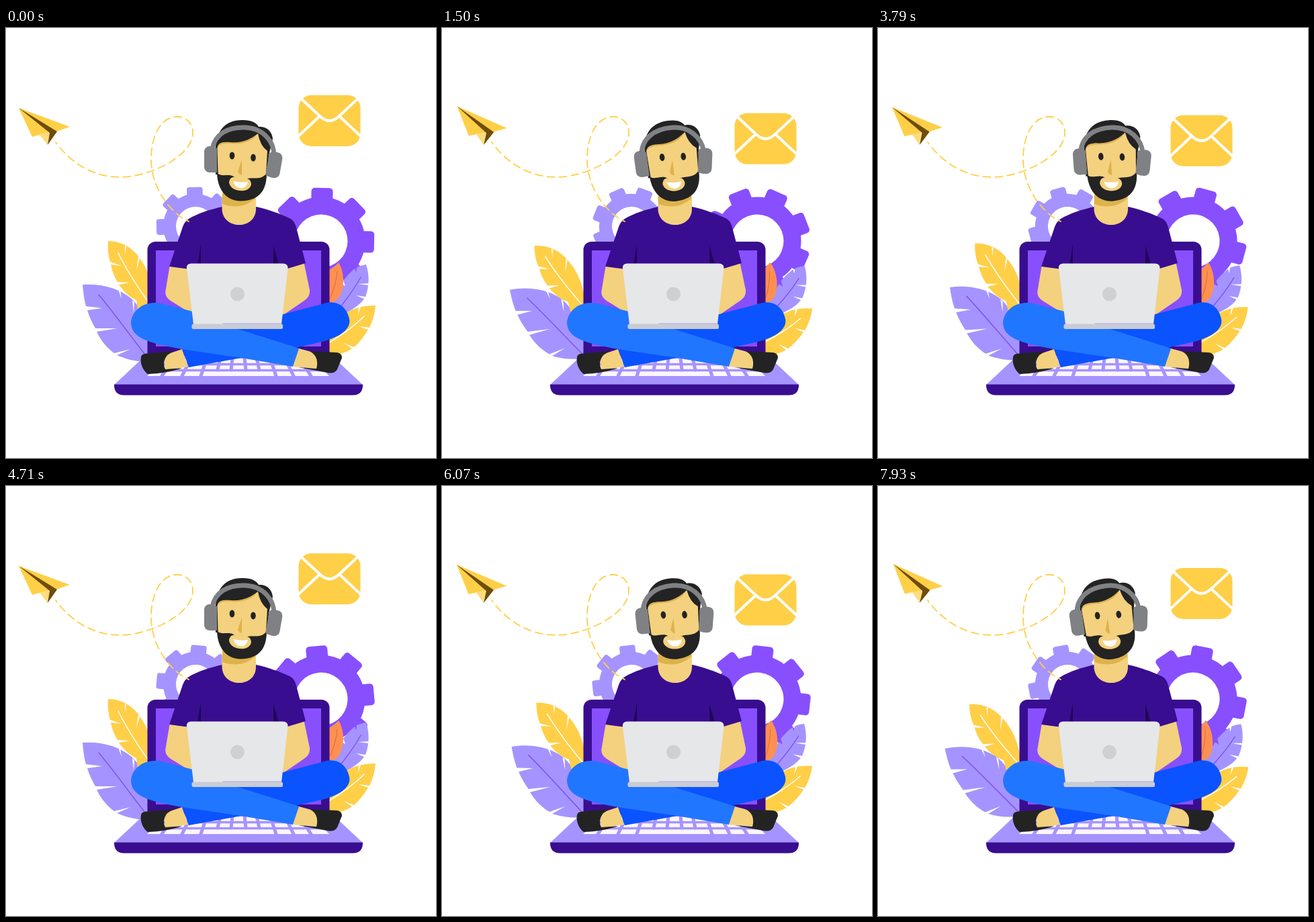
An HTML page that plays this animation: 640x640 px, repeating every 8000 ms.

```html
<!DOCTYPE html>
<html lang="en">
<head>
<meta charset="utf-8">
<title>Working online</title>
<style>
html, body { margin: 0; height: 100%; overflow: hidden; background: #fff; }
svg { display: block; width: 100vw; height: 100vh; --sway: 0; --bob: 0; --spin: 0deg; }
.sway { transform: rotate(calc(var(--sway) * var(--angle))); transform-origin: var(--pivot); }
.bob { transform: translateY(calc(var(--bob) * 32px)); }
.spin { transform: rotate(var(--spin)); transform-origin: 0 0; }
.back { transform: rotate(calc(var(--spin) * -1)); transform-origin: 0 0; }
.line { fill: none; stroke-linecap: round; }
.yellow { fill: #ffcf48; }
.lilac { fill: #a594ff; }
.violet { fill: #884fff; }
.indigo { fill: #390d8f; }
.skin { fill: #f4d17e; }
.tan { fill: #deb24c; }
.black { fill: #232323; }
.grey { fill: #808184; }
.white { fill: #fff; }
</style>
</head>
<body>
<svg id="scene" viewBox="0 0 640 640">
  <defs>
    <g id="gear">
      <rect id="teeth" x="-16" y="-79" width="32" height="158" rx="5"/>
      <use href="#teeth" transform="rotate(45)"/>
      <use href="#teeth" transform="rotate(90)"/>
      <use href="#teeth" transform="rotate(135)"/>
      <circle r="65.500"/>
      <circle r="39.500" class="white"/>
    </g>
    <clipPath id="keys"><path d="M238 492H456L481 518H210Z"/></clipPath>
  </defs>

  <!-- gears -->
  <g transform="translate(282 295) scale(.735)"><use href="#gear" class="back lilac"/></g>
  <g transform="translate(469 317)"><use href="#gear" class="spin violet"/></g>

  <!-- leaves -->
  <g class="sway" style="--angle:-9.8deg; --pivot:172px 495px">
    <path class="lilac" d="M114 382C141 380 168 387 187 403C202 417 213 440 218 496C196 498 179 493 165 487L185 478L161 484C150 476 141 465 135 452L166 447L133 447C128 438 124 430 121 420L143 417L119 414C116 404 115 393 114 382Z"/>
    <path class="white" d="M167 389L172 403L170 390ZM188 405L190 424L191 408Z"/>
    <path class="line" stroke="#8157ee" stroke-width="1.6" d="M138 397C160 423 188 462 214 495"/>
  </g>
  <g class="sway" style="--angle:-8deg; --pivot:218px 470px">
    <path class="yellow" d="M152 317C172 317 190 328 200 344C213 362 222 388 218 424H202L196 419L194 405C183 400 175 392 168 382L184 379L166 378C161 370 158 362 156 352L172 354L155 348C152 338 151 328 152 317Z"/>
    <path class="white" d="M177 324L177 338L179 325ZM197 340L194 361L199 343Z"/>
    <path class="line" stroke="#fff" stroke-width="1.6" d="M167 335C180 361 194 383 214 411"/>
  </g>
  <g class="sway" style="--angle:4.4deg; --pivot:495px 425px">
    <path class="lilac" d="M536 352C541 367 541 384 535 400L521 398L533 403C525 415 508 424 480 437V410C489 403 494 391 499 381L505 384L502 376C507 369 513 363 519 358L521 364L522 356Q529 353 536 352Z"/>
    <path class="white" d="M540 380L524 381L540 383Z"/>
    <path class="line" stroke="#8157ee" stroke-width="1.5" d="M528 371Q516 393 492 422"/>
  </g>
  <g class="sway" style="--angle:-9deg; --pivot:490px 410px">
    <path fill="#ff9052" d="M495 349C503 361 504 382 499 394C495 405 488 409 478 411V361Q488 357 495 349Z"/>
    <path class="line" stroke="#d96d39" d="M493 362Q491 384 482 402"/>
  </g>
  <g class="sway" style="--angle:5.5deg; --pivot:482px 435px">
    <path class="yellow" d="M550 413C549 425 546 436 541 446L525 444L539 449C533 459 526 468 518 475L503 469L515 477C505 484 493 487 478 487V454C487 444 492 438 500 430L503 441L503 427C509 422 517 418 525 416L524 427L528 415Q539 413 550 413Z"/>
    <path class="line" stroke="#fff" stroke-width="1.5" d="M533 429Q513 449 480 469"/>
  </g>

  <!-- large laptop -->
  <rect class="indigo" x="210.500" y="318" width="271" height="185" rx="12"/>
  <rect class="violet" x="223" y="331" width="246" height="143"/>
  <path class="lilac" d="M161 531L207 488H485L531 531Z"/>
  <g clip-path="url(#keys)">
    <path fill="#fdf6ff" d="M200 490H490V518H200Z"/>
    <path class="line" stroke="#a594ff" stroke-width="3.500" d="M200 500.500H490M200 509.500H490"/>
    <path class="line" stroke="#a594ff" stroke-width="5" d="M346 350L232 518M346 350L262 518M346 350L290 518M346 350L402 518M346 350L428 518M346 350L454 518"/>
    <path class="line" stroke="#a594ff" stroke-width="5" d="M319 491L315 509M337 491L335 509M355 491L357 509M373 491L377 509"/>
  </g>
  <path class="indigo" d="M161 530.500H531V533Q530 546.500 516 546.500H176Q162 546.500 161 533Z"/>

  <!-- body -->
  <path class="skin" d="M244 352L237.500 391Q236 400 245 406L282 429L272 354ZM443 347L452 390Q453 399 445 405L410 429L416 354Z"/>
  <path class="indigo" d="M322 266C304 270 285 276 272 284C266 288 264 293 262 299L243 355L274 359H416L446 350L432 297C430 290 428 286 422 283C407 276 390 270 372 266Z"/>
  <path fill="#210659" d="M290 322L285 352H290ZM398 324L406 352H398Z"/>
  <path class="skin" d="M321.500 250V269C322 301 372 301 372 269V250Z"/>
  <path class="tan" d="M322 262Q350 272 371 254V245H322Z"/>

  <!-- legs and shoes -->
  <path fill="#0a53ff" d="M405 428L470 411C491 403 507 414 511 433C514 448 497 460 470 467L435 475L350 491L272 505L262 477L300 440Z"/>
  <path fill="#2176ff" d="M278 422L235 411C207 403 187 420 186 439C187 462 213 469 262 478L350 491L427 504L437 477L345 448H279Z"/>
  <path class="skin" d="M235 487L262 478L271 504L237 509ZM436 477L462 484L464 507L427 504Z"/>
  <path class="black" d="M201 490C202 484 207 485 214 484L249 481L240 487Q232 497 237 508L262 506Q241 514 211 515C205 511 199 500 201 490ZM452 481L493 483Q500 484 500 491L493 508Q490 514 481 513.500L435 505L462 507Q467 489 452 481Z"/>

  <!-- small laptop -->
  <path fill="#e6e7e9" d="M276 350.500H412Q420 350.500 419.500 358L410 441H279L269 358Q268 350.500 276 350.500Z"/>
  <rect x="276.500" y="440.500" width="135.500" height="7.500" rx="2.500" fill="#c9ccd4"/>
  <path class="line" stroke="#a9a0ef" stroke-width="1" d="M323 440H410"/>
  <circle cx="344.500" cy="396" r="10.500" fill="#cfd0d2"/>

  <!-- head -->
  <g class="sway" style="--angle:-11deg; --pivot:351px 257px">
    <path class="black" d="M312 218V190C310 154 325 137 352 137C365 137 373 141 376 147C387 146 396 153 397 165L391 190L389 218Z"/>
    <path class="skin" d="M314.500 178C316 172 320 170 326 170C350 174 366 165 375 157Q378 175 389 183L386 232H316Z"/>
    <path class="tan" d="M315 177C318 170 326 169 334 170C351 172 365 165 374 158C367 169 350 174 334 172Q320 171 315 177Z"/>
    <path class="black" d="M314 216C321 222 329 217 337 220Q348 227 360 224C370 222 380 227 388 216C388 242 377 257 349 257.500C327 257 315 240 314 216Z"/>
    <path class="skin" d="M332 230C333 219 343 221 348 224C355 223 364 222 365 232C364 247 334 245 332 230Z"/>
    <path class="white" d="M338 227.500Q349 231 360 229Q358 239 349 238.500Q340 237 338 227.500Z"/>
    <path class="tan" d="M351 196L345 213Q346 218 351 219Z"/>
    <ellipse class="black" cx="336.500" cy="190" rx="3.800" ry="5.500"/>
    <ellipse class="black" cx="368" cy="193" rx="3.800" ry="5.500"/>
    <path class="line" stroke="#808184" stroke-width="7" d="M307 180C311 158 330 147 356 148C382 149 399 168 399 190"/>
    <rect class="grey" x="295" y="176" width="19" height="39" rx="8"/>
    <path class="grey" d="M304 176L314 179V215H304Z"/>
    <g transform="rotate(10 399 204)">
      <rect class="grey" x="389" y="184.500" width="20.500" height="38.500" rx="8"/>
      <rect class="grey" x="389" y="186" width="10" height="36" rx="3"/>
    </g>
  </g>

  <!-- paper plane -->
  <path class="line" stroke="#ffcf48" stroke-width="1.800" stroke-linecap="butt" stroke-dasharray="11 7" stroke-dashoffset="8" d="M74 170C99 205 135 222 170 222C213 222 278 191 278 156C278 140 267 132 254 132C231 132 216 160 216 195C216 240 246 276 272 288"/>
  <g class="sway" style="--angle:5deg; --pivot:62px 174px">
    <path class="yellow" d="M19 119L95 147L75 154L65 155L39 162Z"/>
    <path fill="#ffdc7d" d="M50 159L65 155L62 174Z"/>
    <path fill="#6f4c08" d="M19 119L76 154L62 174L65 156Z"/>
  </g>

  <!-- envelope -->
  <g class="bob">
    <rect class="yellow" x="435.500" y="100" width="92" height="76" rx="19"/>
    <path class="line" stroke="#fff" stroke-width="4" d="M438 104L467 131Q481.500 145 496 131L525 104M434 162L465 133M529 162L498 133"/>
  </g>
</svg>
<script>
const LOOP = 8000, CYCLE = 4800, FPS = 14, LEAD = 16;
const { style } = document.getElementById('scene');
const swing = (t, period) => (1 - Math.cos(2 * Math.PI * t / period)) / 2;

function draw() {
  const clock = performance.now() % LOOP;
  const t = Math.floor((clock + 5) * FPS / 1000) * 1000 / FPS + LEAD;
  style.setProperty('--sway', swing(t, CYCLE));
  style.setProperty('--bob', swing(t, CYCLE / 2));
  style.setProperty('--spin', 360 * t / CYCLE + 'deg');
  requestAnimationFrame(draw);
}
draw();
</script>
</body>
</html>
```
